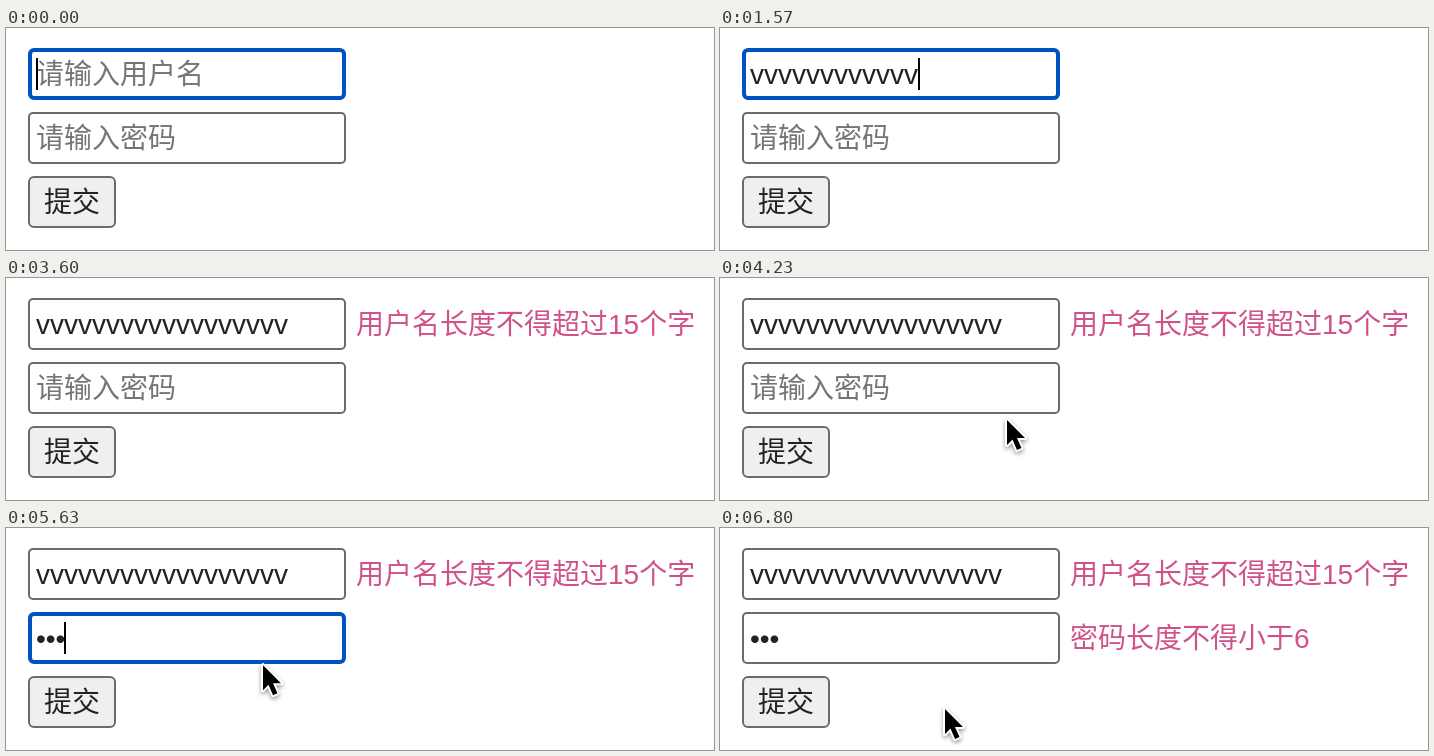
Write an HTML page that moves like this. It is 708x222 px and loops after 7110 ms.

```html
<!DOCTYPE html>
<html lang="zh-CN">
<head>
<meta charset="utf-8">
<title>表单校验</title>
<style>
  html, body { margin: 0; height: 100%; overflow: hidden; background: #fff; }
  svg { display: block; width: 708px; height: 222px; }
  text { font: 28px "Liberation Sans", "Noto Sans CJK SC", "Noto Sans CJK", sans-serif; fill: #222; white-space: pre; }
  .box { fill: #fff; stroke: #6b6b6b; stroke-width: 2; }
  .box.hover { stroke: #444; }
  .box.focus { stroke: #0052c2; stroke-width: 4; }
  .hint { fill: #757575; }
  .error { fill: #d0528a; }
  #arrow { stroke: #fff; stroke-width: 4; stroke-linejoin: round; paint-order: stroke; filter: drop-shadow(0 2px 2px #0006); }
  #beam { fill: none; stroke: #000; stroke-width: 2; }
  #beam .halo { stroke: #fff; stroke-width: 5; }
</style>
</head>
<body>
<svg viewBox="0 0 708 222">
  <defs>
    <path id="bar" d="M-6-15Q-1-15 0-11Q1-15 6-15M0-12V12M-6 15Q-1 15 0 11Q1 15 6 15M-4 1H4"/>
  </defs>
  <g id="user">
    <rect class="box"/>
    <text class="hint" x="30" y="56">请输入用户名</text>
    <text class="value" x="30" y="56"></text>
    <text class="error" x="350" y="56">用户名长度不得超过15个字</text>
  </g>
  <g id="pass" transform="translate(0 64)">
    <rect class="box"/>
    <text class="hint" x="30" y="56">请输入密码</text>
    <text class="value" x="30" y="56"></text>
    <text class="error" x="350" y="56">密码长度不得小于6</text>
  </g>
  <rect x="23" y="149" width="86" height="50" rx="5" fill="#efefef" stroke="#6b6b6b" stroke-width="2"/>
  <text x="38" y="184">提交</text>
  <rect id="caret" width="2" height="32"/>
  <g id="beam"><use href="#bar" class="halo"/><use href="#bar"/></g>
  <path id="arrow" d="M0 0V25L5.5 19.5L10 30L14.5 28L10 18H18Z"/>
</svg>
<script>
const LOOP = 7110;
const $ = id => document.getElementById(id);
const show = (el, on) => el.style.display = on ? '' : 'none';
const between = (t, a, b) => t >= a && t < b;

// pointer stops: time, x, y
const stops = [
  [4100, 329, 212], [4430, 263, 102], [5570, 263, 102], [5630, 257, 137],
  [5800, 257, 154], [6170, 257, 154], [6300, 225, 181], [LOOP, 225, 181]
];

function pointer(t) {
  if (t < stops[0][0] || between(t, 5400, 5570)) return null;
  const i = stops.findIndex(s => t < s[0]);
  const [t0, x0, y0] = stops[i - 1], [t1, x1, y1] = stops[i];
  const k = (t - t0) / (t1 - t0), e = k * (2 - k);
  return { x: x0 + (x1 - x0) * e, y: y0 + (y1 - y0) * e };
}

function typedUser(t) {
  if (t < 800) return 0;
  if (t < 1200) return 1;
  return 2 + Math.round(16 * Math.min(1, (t - 1200) / 570));
}

const typedPass = t => [5400, 5500, 5570].filter(at => t >= at).length;

function drawField(id, value, focus, hover, error) {
  const g = $(id), box = g.querySelector('.box'), inset = focus ? 2 : 1;
  box.setAttribute('class', 'box' + (focus ? ' focus' : hover ? ' hover' : ''));
  const size = { x: 22 + inset, y: 20 + inset, width: 318 - 2 * inset, height: 52 - 2 * inset, rx: 4 };
  for (const key in size) box.setAttribute(key, size[key]);
  show(g.querySelector('.hint'), !value);
  g.querySelector('.value').textContent = value;
  show(g.querySelector('.error'), error);
}

function place(el, on, x, y) {
  show(el, on);
  if (on) el.setAttribute('transform', `translate(${x} ${y})`);
}

function draw(t) {
  const p = pointer(t), users = typedUser(t), dots = typedPass(t);
  const inUser = t < 2400, inPass = between(t, 4670, 6700);
  const over = !!p && p.x < 340 && between(p.y, 84, 136);
  drawField('user', 'v'.repeat(users), inUser, false, !inUser);
  drawField('pass', '•'.repeat(dots), inPass, over, t >= 6700);

  const blink = [[300, 800], [2270, 2400], [5170, 5400], [6070, 6600]].some(([a, b]) => between(t, a, b));
  const caretX = 30 + (inUser ? 14 * users : Math.floor(9.6 * dots));
  place($('caret'), (inUser || inPass) && !blink, caretX, inUser ? 30 : 94);
  place($('beam'), over, p?.x, p?.y);
  place($('arrow'), !!p && !over, p?.x, p?.y);
}

const start = performance.now();
function frame() {
  draw((performance.now() - start) % LOOP);
  requestAnimationFrame(frame);
}
frame();
</script>
</body>
</html>
```
